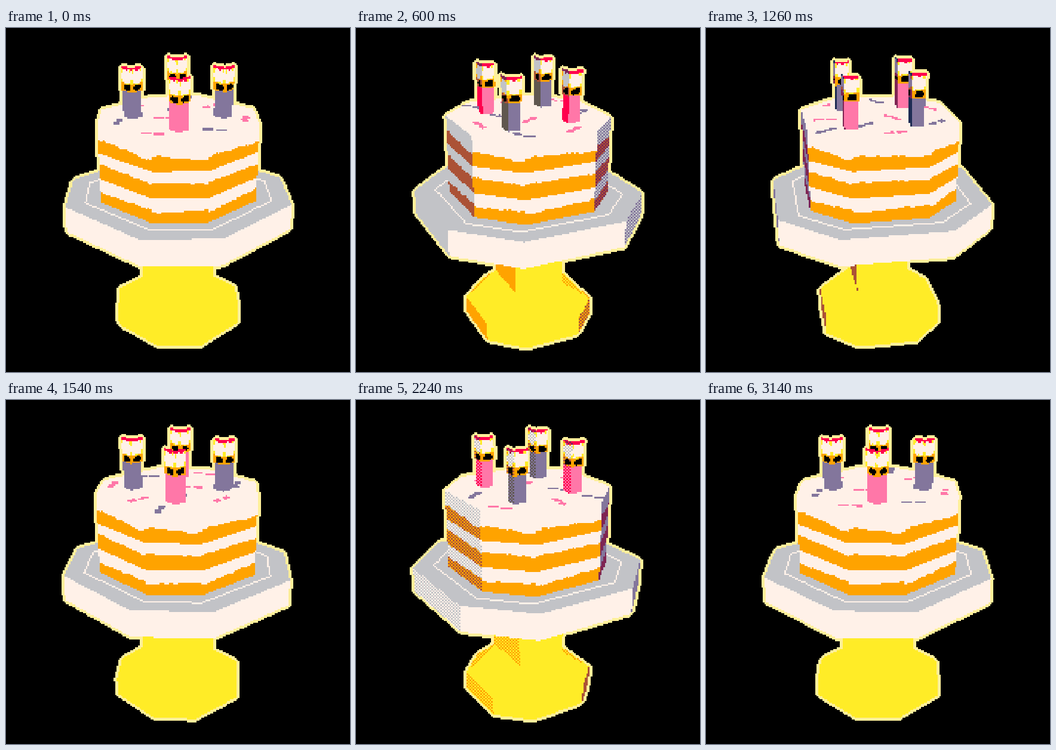
An HTML page with a canvas that plays this animation: 576 px wide and 576 px high, repeating every 3160 ms.

```html
<!DOCTYPE html>
<html lang="en">
<head>
<meta charset="utf-8">
<title>Spinning cake</title>
<style>
  html, body { margin: 0; width: 100%; height: 100%; overflow: hidden; background: #000; }
  canvas { display: block; width: 100vw; height: 100vh; image-rendering: pixelated; }
</style>
</head>
<body>
<canvas id="stage" width="224" height="224"></canvas>
<script>
const SIZE = 224, UNIT = 576 / SIZE, LOOP = 3160, STEP = 20;
const START_ANGLE = 1.5 * Math.PI / 180;
const DIST = 1200, SIN = 0.39, COS = 0.92;
const CAKE_TOP = 145, PLATE_TOP = 15;
const ctx = document.getElementById('stage').getContext('2d');
const image = ctx.createImageData(SIZE, SIZE);
const out = new Uint32Array(image.data.buffer);
const grid = new Uint8Array(SIZE * SIZE);

const palette = ['000000', '000000', 'fff1e8', 'c2c3c7', '83769c', '5f574f', 'ffa300',
  'ab5236', '7e2553', 'ffec27', 'ff77a8', 'ff004d', '1d2b53', 'fff09a'];
const rgba = palette.map(h => {
  const n = parseInt(h, 16);
  return (255 << 24 | (n & 255) << 16 | (n & 0xff00) | n >> 16) >>> 0;
});
const BLACK = 1, WHITE = 2, GRAY = 3, LAVENDER = 4, SLATE = 5, ORANGE = 6, BROWN = 7,
  PLUM = 8, YELLOW = 9, PINK = 10, RED = 11, NAVY = 12, GLOW = 13;
const shades = {
  [BLACK]: [BLACK, BLACK], [WHITE]: [GRAY, LAVENDER], [GRAY]: [LAVENDER, SLATE],
  [LAVENDER]: [SLATE, NAVY], [ORANGE]: [BROWN, PLUM], [YELLOW]: [ORANGE, BROWN],
  [PINK]: [RED, PLUM], [RED]: [PLUM, NAVY]
};

let turnSin = 0, turnCos = 1;

// x to the right, y up, z towards the viewer
const turn = (x, y, z) => [x * turnCos + z * turnSin, y, z * turnCos - x * turnSin];

function project([x, y, z]) {
  const s = DIST / (DIST - z * COS - y * SIN);
  return [(288 + x * s) / UNIT, (288 + (z * SIN - y * COS) * s) / UNIT];
}

// level 4 is fully lit, 0 darkest; odd levels are checkered
function fill(points, color, level = 4) {
  const [mid, dark] = shades[color];
  const even = [dark, dark, mid, mid, color][level];
  const odd = [dark, mid, mid, color, color][level];
  const ys = points.map(p => p[1]);
  const top = Math.max(0, Math.ceil(Math.min(...ys) - 0.5));
  const end = Math.min(SIZE, Math.ceil(Math.max(...ys) - 0.5));
  for (let y = top; y < end; y++) {
    let lo = SIZE, hi = 0;
    points.forEach((a, i) => {
      const b = points[(i + 1) % points.length], c = y + 0.5;
      if (a[1] <= c === b[1] <= c) return;
      const x = a[0] + (b[0] - a[0]) * (c - a[1]) / (b[1] - a[1]);
      lo = Math.min(lo, x);
      hi = Math.max(hi, x);
    });
    for (let x = Math.max(0, Math.ceil(lo - 0.5)); x < Math.min(SIZE, Math.ceil(hi - 0.5)); x++)
      grid[y * SIZE + x] = (x + y) & 1 ? odd : even;
  }
}

function line(a, b, color) {
  const n = Math.max(1, Math.ceil(Math.max(Math.abs(b[0] - a[0]), Math.abs(b[1] - a[1]))));
  for (let i = 0; i <= n; i++) {
    const x = Math.floor(a[0] + (b[0] - a[0]) * i / n);
    const y = Math.floor(a[1] + (b[1] - a[1]) * i / n);
    grid[y * SIZE + x] = color;
  }
}

const sub = (a, b) => a.map((v, i) => v - b[i]);
const mix = (a, b, t) => a.map((v, i) => v + (b[i] - v) * t);

function lightLevel(q) {
  const a = sub(q[3], q[1]), b = sub(q[2], q[0]);
  const n = [a[1] * b[2] - a[2] * b[1], a[2] * b[0] - a[0] * b[2], a[0] * b[1] - a[1] * b[0]];
  const lit = (n[1] + n[2]) * Math.SQRT1_2 / Math.hypot(...n);
  return [0.2, 0.25, 0.32, 0.39].filter(t => lit > t).length;
}

// corners: top left, top right, bottom right, bottom left
function face(q, paint) {
  const s = q.map(project);
  let area = 0;
  s.forEach((a, i) => {
    const b = s[(i + 1) % 4];
    area += a[0] * b[1] - a[1] * b[0];
  });
  if (area <= 0) return;
  const level = lightLevel(q);
  const at = (u, v) => project(mix(mix(q[0], q[1], u), mix(q[3], q[2], u), v));
  paint((u0, v0, u1, v1, color) =>
    fill([at(u0, v0), at(u1, v0), at(u1, v1), at(u0, v1)], color, level));
}

const plain = color => patch => patch(0, 0, 1, 1, color);

// square with cut corners: sides at distance b, each 2a long
function octagon(b, y, a = b / 3) {
  return [[0, 1], [1, 0], [0, -1], [-1, 0]].flatMap(([s, c]) =>
    [-a, a].map(side => turn(side * c + b * s, y, b * c - side * s)));
}

function square(r, y, cx = 0, cz = 0) {
  return [[0, r], [r, 0], [0, -r], [-r, 0]].map(([x, z]) => turn(cx + x, y, cz + z));
}

function walls(top, bottom, paint) {
  top.forEach((p, i) => {
    const j = (i + 1) % top.length;
    face([p, top[j], bottom[j], bottom[i]], paint);
  });
}

const noise = n => {
  const v = Math.sin(n * 12.9898) * 43758.5453;
  return v - Math.floor(v);
};

// three sponge layers (upper edge, its drift, lower edge), each with a ragged top
function sponge(patch) {
  const cells = 12;
  patch(0, 0, 1, 1, WHITE);
  [[0.17, 0.05, 0.36], [0.48, 0.03, 0.69], [0.85, -0.03, 1]].forEach(([from, drift, to], band) => {
    for (let c = 0; c < cells; c++) {
      const top = from + drift * c / cells + 0.025 * noise(band * 17 + c + 1);
      patch(c / cells, top, (c + 1) / cells, to, ORANGE);
    }
  });
}

function flame(patch) {
  patch(0, 0, 1, 1, WHITE);
  patch(0, 0, 1, 0.11, RED);
  patch(0.4, 0.1, 0.65, 0.16, RED);
  patch(0, 0.1, 0.15, 0.27, YELLOW);
  patch(0.75, 0.1, 0.9, 0.2, YELLOW);
  patch(0, 0.5, 0.14, 0.7, YELLOW);
  patch(0.86, 0.5, 1, 0.7, YELLOW);
  patch(0, 0.66, 1, 1, ORANGE);
  patch(0.35, 0.64, 0.65, 0.71, YELLOW);
  patch(0.3, 0.72, 0.8, 0.96, BLACK);
  patch(0.2, 0.79, 0.88, 0.91, BLACK);
}

// place, direction, colour
const sprinkles = [
  [-94, 27, 0, 1, LAVENDER], [21, -108, 0, 1, LAVENDER], [54, 72, 1, 0, LAVENDER],
  [-10, -50, 0, 1, LAVENDER], [-40, 89, 1, 0, PINK], [-21, 9, 1, 0, PINK],
  [106, 17, 0, 1, PINK], [58, -62, 0.64, -0.77, PINK], [-70, -54, 0.5, -0.87, PINK]
];
const candles = [[0, 72, PINK], [72, 0, LAVENDER], [0, -72, PINK], [-72, 0, LAVENDER]];

function sprinkle([x, z, dx, dz, color]) {
  for (const side of [-1, 1]) {
    const cx = x + side * (dx * 10 - dz * 2), cz = z + side * (dz * 10 + dx * 2);
    const box = [[-8, -5], [8, -5], [8, 5], [-8, 5]].map(([u, w]) =>
      project(turn(cx + dx * u - dz * w, CAKE_TOP, cz + dz * u + dx * w)));
    fill(box, color);
  }
}

function candle([x, z, color]) {
  walls(square(14.6, 188, x, z), square(14.6, CAKE_TOP, x, z), plain(color));
  walls(square(16, 227, x, z), square(16, 188, x, z), flame);
}

function pedestal() {
  const rim = octagon(104, -188), neck = square(61, -145), paint = plain(YELLOW);
  walls(rim, octagon(104, -220), paint);
  neck.forEach((p, k) => {
    const next = neck[(k + 1) % 4], a = rim[2 * k], b = rim[2 * k + 1], c = rim[(2 * k + 2) % 8];
    face([p, p, b, a], paint);
    face([p, next, c, b], paint);
  });
  walls(square(61, -28), neck, paint);
}

function plate() {
  const top = octagon(180, PLATE_TOP);
  walls(top, octagon(180, -28), plain(WHITE));
  fill(top.map(project), GRAY);
  const ring = octagon(150, PLATE_TOP, 44).map(project);
  ring.forEach((p, i) => line(p, ring[(i + 1) % 8], WHITE));
}

function cake() {
  const top = octagon(125, CAKE_TOP);
  walls(top, octagon(125, PLATE_TOP), sponge);
  fill(top.map(project), WHITE);
  sprinkles.forEach(sprinkle);
  const depth = ([x, z]) => turn(x, 0, z)[2];
  [...candles].sort((a, b) => depth(a) - depth(b)).forEach(candle);
}

function outline() {
  for (let pass = 0; pass < 2; pass++) {
    const old = grid.slice();
    for (let i = SIZE; i < old.length - SIZE; i++)
      if (!old[i] && (old[i - 1] || old[i + 1] || old[i - SIZE] || old[i + SIZE])) grid[i] = GLOW;
  }
}

function draw(ms) {
  const step = Math.floor(ms % LOOP / STEP);
  const angle = START_ANGLE + step * STEP / LOOP * 2 * Math.PI;
  turnSin = Math.sin(angle);
  turnCos = Math.cos(angle);
  grid.fill(0);
  pedestal();
  plate();
  cake();
  outline();
  grid.forEach((c, i) => { out[i] = rgba[c]; });
  ctx.putImageData(image, 0, 0);
}

const start = performance.now();
function tick() {
  draw(performance.now() - start);
  requestAnimationFrame(tick);
}
tick();
</script>
</body>
</html>
```
